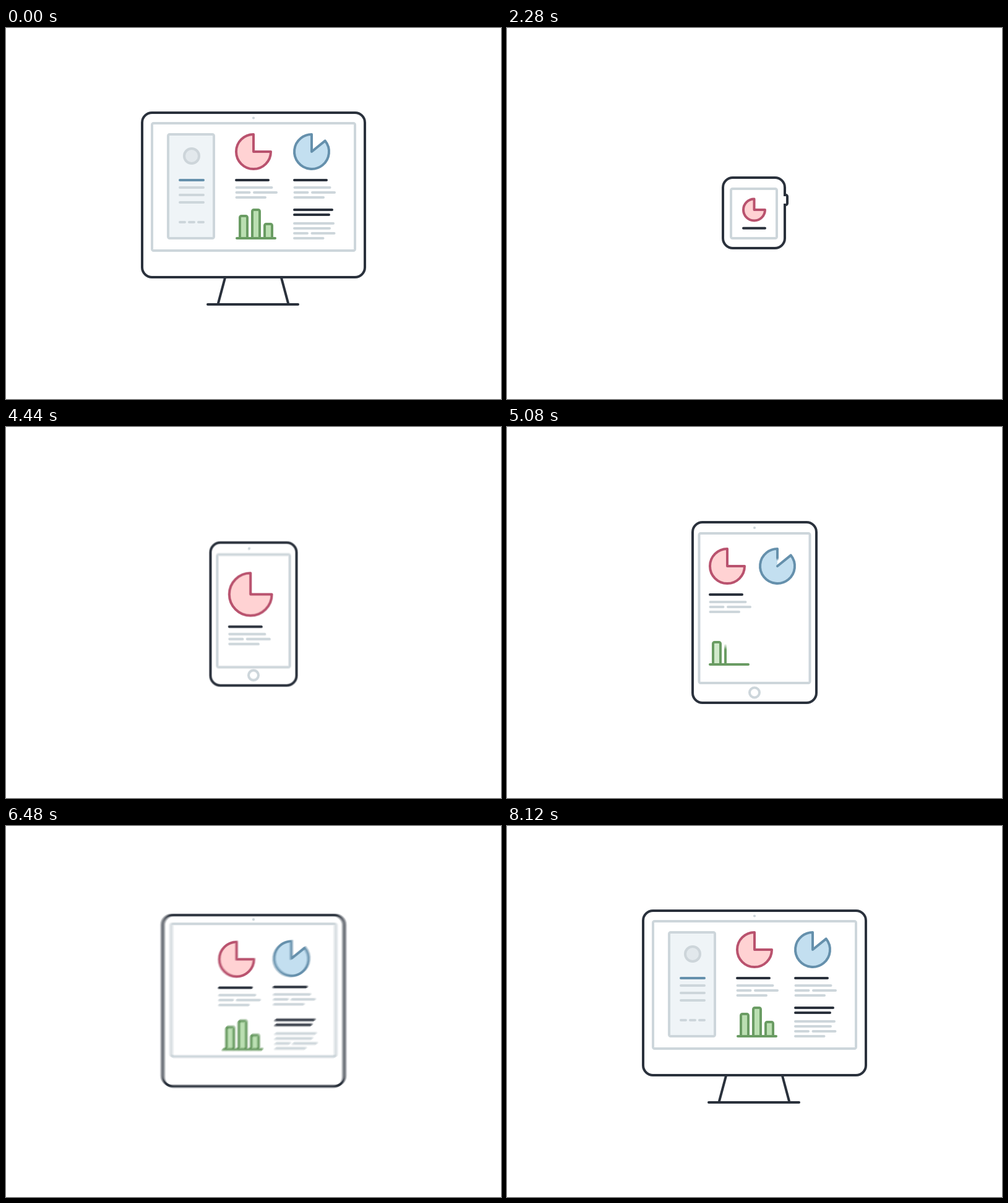
Animation of 800x600 px, one loop 9240 ms. Source, as an HTML page with a canvas:

```html
<!DOCTYPE html>
<html lang="en">
<head>
<meta charset="utf-8">
<title>Responsive devices</title>
<style>
html, body { margin: 0; width: 100%; height: 100%; overflow: hidden; background: #fff; }
canvas { display: block; width: 800px; height: 600px; }
</style>
</head>
<body>
<canvas id="stage" width="800" height="600"></canvas>
<script>
const LOOP = 9240, STEP = 40, SHUTTER = 20, SAMPLES = 8;
const INK = '#2a313c', GREY = '#cdd6db';
const PINK = ['#b9526e', '#ffd2d3'], BLUE = ['#6590ac', '#c3dff0'], GREEN = ['#6a9c63', '#bbdfb2'];
const [PHONE, TABLET, DESKTOP] = [2880, 4200, 6120]; // when each device starts to form
const MOVES = [PHONE, TABLET, DESKTOP];

const view = document.getElementById('stage').getContext('2d');
const layer = document.createElement('canvas');
layer.width = 800;
layer.height = 600;
const c = layer.getContext('2d');

const lerp = (a, b, p) => a + (b - a) * p;
const span = (t, from, dur) => Math.max(0, Math.min(1, (t - from) / dur));
const inOut = u => u < 0.5 ? 2 * u * u : 1 - 2 * (1 - u) ** 2;
const grow = (t, from, dur) => inOut(span(t, from, dur));
const pop = (t, from, dur) => 1 - (1 - span(t, from, dur)) ** 3;
const backOut = u => 1 + 2.15 * (u - 1) ** 3 + 1.15 * (u - 1) ** 2;

// Cubic in-out, then a slight overshoot that settles
function glide(u) {
  if (u <= 0) return 0;
  if (u >= 1) return u < 1.15 ? 1 + 0.0125 * Math.sin(Math.PI * (u - 1) / 0.15) : 1;
  return u < 0.5 ? 4 * u ** 3 : 1 - 4 * (1 - u) ** 3;
}

// Carries a value through the last moves, one key per device
function track(t, keys, delay = 0, dur = 680) {
  const starts = MOVES.slice(1 - keys.length);
  return starts.reduce((v, s, i) => lerp(v, keys[i + 1], glide((t - s - delay) / dur)), keys[0]);
}

function stroke(color, width = 4) {
  c.strokeStyle = color;
  c.lineWidth = width;
  c.stroke();
}

function fill(color, alpha = 1) {
  c.globalAlpha = alpha;
  c.fillStyle = color;
  c.fill();
  c.globalAlpha = 1;
}

function trim(color, length, p) {
  if (p <= 0) return;
  if (p < 1) c.setLineDash([length * p, length * 2]);
  stroke(color);
  c.setLineDash([]);
}

function line(x1, y1, x2, y2, color, p = 1, width = 4) {
  if (p <= 0) return;
  c.beginPath();
  c.moveTo(x1, y1);
  c.lineTo(lerp(x1, x2, p), lerp(y1, y2, p));
  stroke(color, width);
}

const row = (x, y, w, color, p, width) => line(x, y, x + w, y, color, p, width);

function box(x, y, half, bottom, r) {
  c.beginPath();
  c.roundRect(x - half, y, half * 2, bottom - y, r);
}

function disc(x, y, r) {
  c.beginPath();
  c.arc(x, y, r, 0, 7);
}

function pie(x, y, r, angle, [edge, body], p, alpha) {
  if (p <= 0) return;
  const end = Math.PI * 1.5;
  c.beginPath();
  c.moveTo(x, y);
  c.arc(x, y, r, angle, end);
  if (p < 1) c.lineTo(x, y);
  else c.closePath();
  fill(body, alpha);
  trim(edge, r * (2 + end - angle), p);
}

// The line before the last is split in two, the last one is short
function paragraph(x, y, n, t, from) {
  for (let i = 0; i < n; i++) {
    const p = grow(t, from + i * 80, 260), ly = y + i * 8;
    if (i === n - 2) {
      row(x, ly, 21, GREY, p);
      row(x + 28.5, ly, 36, GREY, p);
    } else row(x, ly, i === n - 1 ? 46.5 : 57 + (n - 3 - i) * 6, GREY, p);
  }
}

function caption(x, y, r, t, titleAt, textAt) {
  const left = x - r, top = y + r + Math.min(18, r * 0.7);
  row(left, top, Math.min(52, r * 2), INK, grow(t, titleAt, 280));
  paragraph(left + 0.5, top + 12, 3, t, textAt);
}

function bars(x, y, t) {
  [36, 46, 23].forEach((h, i) => {
    const start = 4830 + i * 193, l = x + 5 + i * 20, r = l + 12, top = y - h;
    c.beginPath();
    c.moveTo(l, y);
    c.arcTo(l, top, r, top, 2.5);
    c.arcTo(r, top, r, y, 2.5);
    c.lineTo(r, y);
    fill(GREEN[1], span(t, start + 130, 190));
    trim(GREEN[0], 2 * h + 12, span(t, start, 220));
  });
  row(x, y, 62, GREEN[0], grow(t, 4680, 280));
}

function trampoline(t) {
  const HIT = 870, LEAVE = 1090, REST = 425;
  let y = lerp(-10, REST, span(t, 560, 310) ** 2), dip = 0;
  if (t > LEAVE) {
    const s = t - LEAVE;
    y = lerp(REST, 299, 1 - (1 - span(t, LEAVE, 270)) ** 2);
    dip = -9 * Math.exp(-s / 60) * Math.sin(s / 24);
  } else if (t > HIT) {
    dip = 20 * Math.sin(Math.PI * (t - HIT) / (LEAVE - HIT));
    y += dip;
  }
  const w = 150 * grow(t, 400, 240) * (1 - grow(t, 1360, 240));
  if (w > 0) {
    const bend = 430 + dip * 0.9;
    c.beginPath();
    c.moveTo(400 - w, 430);
    c.quadraticCurveTo(400 - w * 0.27, bend, 400, 430 + dip);
    c.quadraticCurveTo(400 + w * 0.27, bend, 400 + w, 430);
    stroke(INK);
  }
  if (t > 560 && t < 1360) {
    disc(400.5, y, 5);
    fill(INK);
  }
}

function crown(x, out) {
  if (out <= 0) return;
  const tip = x + 4 * out;
  c.fillStyle = '#fff';
  c.fillRect(x - 2, 272, 4, 12);
  c.beginPath();
  c.moveTo(x, 270);
  c.arcTo(tip, 270, tip, 286, 2.5);
  c.arcTo(tip, 286, x, 286, 2.5);
  c.lineTo(x, 286);
  stroke(INK);
}

function shell(t) {
  const mid = 399 + grow(t, PHONE, 600);
  const born = backOut(span(t, 1360, 480));
  const half = lerp(3, track(t, [50, 63, 100, 180]), born);
  const top = lerp(296, track(t, [242, 194, 154, 137]), born);
  const bottom = lerp(302, track(t, [356, 412, 446, 403]), born);
  box(mid, top, half, bottom, Math.min(16, half));
  stroke(INK);
  crown(mid + half, pop(t, 1760, 240) * (1 - grow(t, PHONE, 160)));

  const open = pop(t, 1600, 320);
  const screenTop = track(t, [260, 219, 172, 154], 0, 590);
  const screenBottom = track(t, [340, 379, 414, 360], 0, 590);
  if (open > 0) {
    c.globalAlpha = open;
    box(mid, lerp(300, screenTop, open), track(t, [37, 52, 89.5, 164]) * open,
      lerp(300, screenBottom, open), 2.5);
    stroke(GREY);
    c.globalAlpha = 1;
  }

  const camY = (top + screenTop) / 2;
  disc(400 - 13 * (1 - grow(t, TABLET, 500)), camY, 2.1 * pop(t, 3280, 240));
  fill(GREY);
  row(398, camY, 12.5, GREY, grow(t, 3340, 300) * (1 - grow(t, TABLET, 200)), 3);

  const home = pop(t, 3120, 300) * (1 - grow(t, DESKTOP, 200));
  if (home > 0) {
    disc(400, bottom - 16.5, 8 * home);
    stroke(GREY, 4 * home);
  }
}

function charts(t) {
  const x = track(t, [399.5, 399, 356, 400], 50);
  const y = track(t, [294, 275, 225, 200], 50);
  const r = track(t, [17.5, 35, 28, 28], 50);
  pie(x, y, r, 0, PINK, grow(t, 1740, 440), span(t, 1900, 300));
  caption(x, y, r, t, 2000, 3260);

  const x2 = track(t, [437, 494], 38), y2 = track(t, [225, 200], 38);
  pie(x2, y2, 28, -0.68, BLUE, grow(t, 4520, 680), span(t, 4700, 380));
  caption(x2, y2, 28, t, 5160, 5240);

  bars(track(t, [328, 373], 16), track(t, [384, 340], 16), t);

  const tx = track(t, [406, 466], 18), ty = track(t, [334, 294], 18);
  row(tx, ty, 61, INK, grow(t, 5460, 260));
  row(tx, ty + 8, 56, INK, grow(t, 5520, 260));
  paragraph(tx, ty + 22, 4, t, 5560);
}

function stand(t) {
  const base = 73 * grow(t, 6680, 340);
  if (base > 0) row(399 - base, 447, base * 2, INK);
  for (const side of [-1, 1]) {
    line(399.5 + side * 56.5, 445, 399.5 + side * 45.5, 404, INK, grow(t, 7040, 320));
  }
}

function sidebar(t) {
  const drawn = grow(t, 7080, 480);
  if (drawn <= 0) return;
  box(299, 172, 37, 340, 2.5);
  fill('#eff4f7', span(t, 7320, 320));
  trim(GREY, 480, drawn);
  const face = pop(t, 7440, 280);
  if (face > 0) {
    disc(300, 207, 12 * face);
    fill('#e2e8ec');
    stroke('#cdd5da', 4 * face);
  }
  for (let i = 0; i < 3; i++) {
    row(281, 258 + i * 12, 38, GREY, grow(t, 7520 + i * 50, 220));
    row(281 + i * 15, 314, 8, GREY, grow(t, 7670 + i * 50, 220));
  }
  c.globalAlpha = span(t, 7840, 280);
  row(281, 246, 38, BLUE[0]);
  c.globalAlpha = 1;
}

function scene(t) {
  c.fillStyle = '#fff';
  c.fillRect(0, 0, 800, 600);
  c.lineCap = c.lineJoin = 'round';
  if (t < 1620) trampoline(t);
  if (t < 1360) return;
  stand(t);
  shell(t);
  sidebar(t);
  charts(t);
}

// Averages several moments inside the shutter for motion blur
function expose(t) {
  for (let i = 0; i < SAMPLES; i++) {
    scene(t + ((i + 0.5) / SAMPLES - 0.5) * SHUTTER);
    view.globalAlpha = 1 / (i + 1);
    view.drawImage(layer, 0, 0);
  }
}

const begin = performance.now();
let shown = -1;
function tick() {
  const now = (performance.now() - begin) % LOOP;
  const t = Math.floor(now / STEP) * STEP;
  if (t !== shown) {
    shown = t;
    expose(t < 160 ? 9000 : t); // the finished desktop holds briefly, then cuts to blank
  }
  requestAnimationFrame(tick);
}
tick();
</script>
</body>
</html>
```
